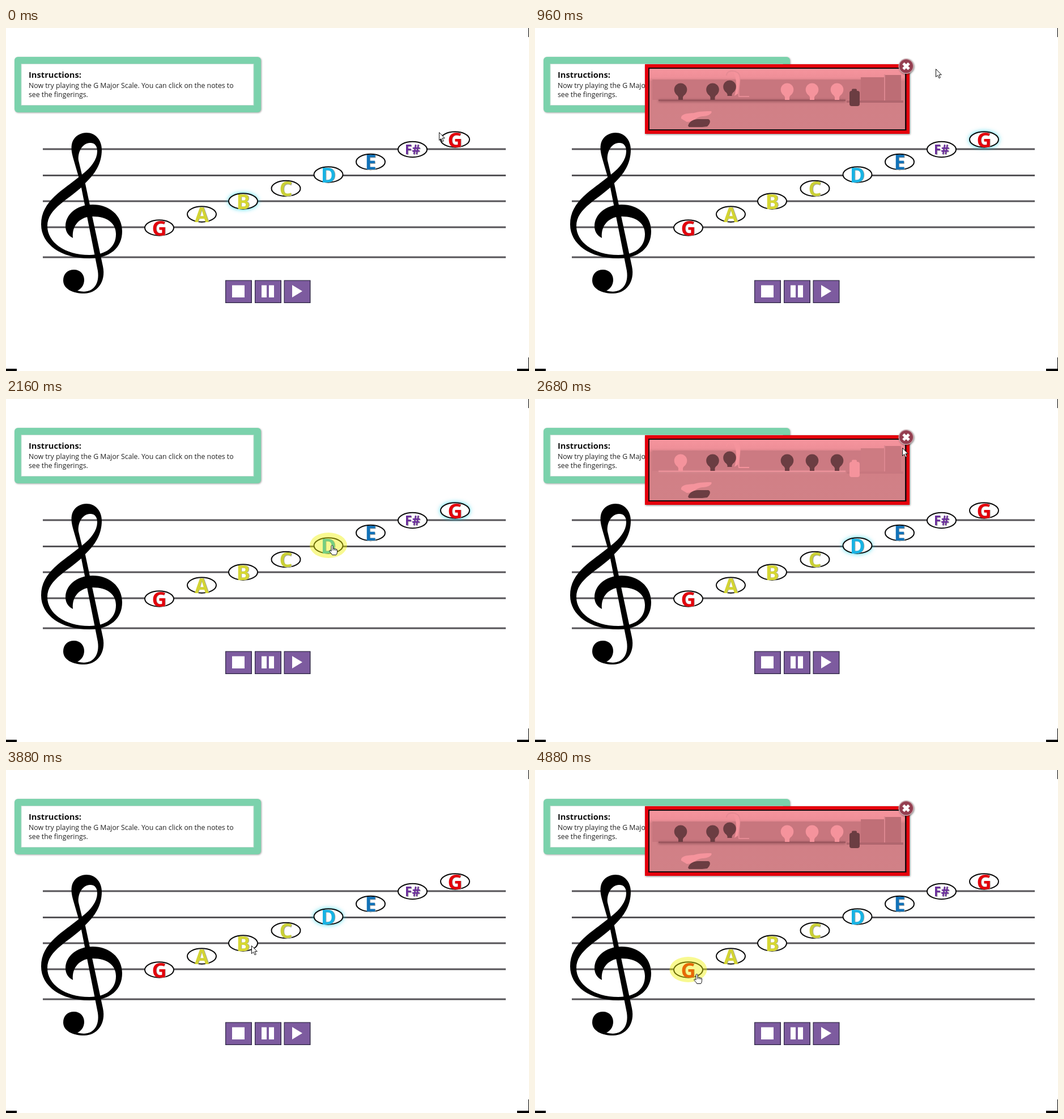
An HTML page with a canvas that plays this animation: 923 px wide and 606 px high, repeating every 4.92 s.

```html
<!DOCTYPE html>
<html lang="en">
<head>
<meta charset="utf-8">
<title>G Major Scale</title>
<style>
html, body { margin: 0; width: 100%; height: 100%; overflow: hidden; background: #fff; }
canvas { display: block; width: 100vw; height: 100vh; }
</style>
</head>
<body>
<canvas id="stage" width="923" height="606"></canvas>
<script>
const LOOP = 4920, STEP = 40;
const ctx = document.getElementById('stage').getContext('2d');
const FONT = '"Open Sans", "Noto Sans", sans-serif';

const notes = [
  ['G', 270.5, 353, '#e3000b'], ['A', 345.5, 329, '#d3d433'],
  ['B', 418.5, 306, '#d6d733'], ['C', 494, 283.5, '#c9cf35'],
  ['D', 569, 259, '#18b3e4'], ['E', 643.5, 236.5, '#1272b8'],
  ['F#', 717.5, 214.5, '#6a2c9c'], ['G', 792.5, 197, '#e3000b']
];

// Each move: start, end, from, control point, to
const moves = [
  [0, 200, [764, 184], [784, 188], [797, 198]],
  [680, 1200, [797, 198], [705, 25], [655, 68]],
  [1480, 2050, [655, 68], [640, 190], [575, 258]],
  [2400, 2800, [575, 258], [645, 95], [655, 68]],
  [3160, 4300, [658, 67], [551, 308], [285, 360]]
];
const handTimes = [[120, 720], [1160, 1280], [2040, 2440], [2760, 2960], [4280, LOOP]];
const hovers = [[7, 120, 720], [4, 2080, 2440], [0, 4320, LOOP]];
const glows = [[2, 0, 480], [7, 480, 2400], [4, 2400, 4880]];
const popups = [
  { span: [440, 1280], closed: [1, 1, 1, 0, 0, 0, 1] },
  { span: [2360, 2960], closed: [0, 1, 1, 1, 1, 1, 0] },
  { span: [4880, LOOP], closed: [1, 1, 1, 0, 0, 0, 1] }
];

const within = (t, [a, b]) => t >= a && t < b;
const clefParts = [
  // upper loop
  'M142 185C158 185 169 198 169 215C169 240 157 258 139 275L129 266L118 228C114 213 115 203 120 196C125 189 133 185 142 185Z' +
  'M149 203C137 202 126 217 128 234L134 259C150 247 161 232 161 218C161 209 157 203 149 203Z',
  // belly and spiral
  'M130 262C102 286 62 305 62 347C62 382 97 407 147 407C184 407 205 388 205 359C205 330 181 312 153 312C124 312 105 330 105 350C105 360 110 367 118 371C116 349 130 333 153 333C180 333 194 346 194 364C194 387 177 401 147 401C103 401 73 378 73 350C73 318 112 303 139 276Z',
  // stem and tail
  'M129 262L138 266L171 421C177 449 160 469 138 469C118 469 101 461 101 446C101 434 109 427 120 427C131 427 138 435 138 445C138 454 133 461 126 464C150 471 166 456 162 429Z'
].map(d => new Path2D(d));
const arrow = new Path2D('M0 0V14L3.2 11L5.6 16.2L7.8 15.2L5.5 10.2H9.8Z');
const hand = new Path2D('M-1.5 1Q0 -1 1.5 1V6Q3 4.8 4.3 6.4Q5.8 5.4 6.8 7Q8.6 6.4 9 8.2V12Q9 14.5 7.2 17H.2Q-1.2 14 -4.5 11Q-5 8.5 -3.2 9L-1.5 10.6Z');
const closeMark = new Path2D('M-5 -5L5 5M5 -5L-5 5');

function rect(x, y, w, h, color) {
  ctx.fillStyle = color;
  ctx.fillRect(x, y, w, h);
}

function round(x, y, w, h, r, color) {
  ctx.fillStyle = color;
  ctx.beginPath();
  ctx.roundRect(x, y, w, h, r);
  ctx.fill();
}

function oval(x, y, rx, ry) {
  ctx.beginPath();
  ctx.ellipse(x, y, rx, ry, 0, 0, Math.PI * 2);
}

function shape(d, color) {
  ctx.fillStyle = color;
  ctx.fill(new Path2D(d));
}

function write(str, x, y, font, color) {
  ctx.font = `${font} ${FONT}`;
  ctx.fillStyle = color;
  ctx.fillText(str, x, y);
}

function shadow(color, blur, dx = 0, dy = 0) {
  ctx.shadowColor = color;
  ctx.shadowBlur = blur;
  ctx.shadowOffsetX = dx;
  ctx.shadowOffsetY = dy;
}

const noShadow = () => shadow('transparent', 0);

function drawInstructions() {
  shadow('rgba(0,0,0,.35)', 3, 1, 1);
  round(15, 51, 435, 98, 6, '#7bd2ac');
  noShadow();
  rect(26.5, 63, 411, 74, '#b9d9cb');
  rect(27.5, 64, 409, 72, '#fff');
  ctx.textAlign = 'left';
  write('Instructions:', 40, 88, 'bold 14.67px', '#111');
  write('Now try playing the G Major Scale. You can click on the notes to', 40, 106, '12.3px', '#222');
  write('see the fingerings.', 40, 122, '12.3px', '#222');
}

function drawStaff() {
  for (const y of [214, 260.5, 306, 352, 405]) rect(65, y - 1.5, 817, 3, '#555357');
  ctx.fillStyle = '#000';
  clefParts.forEach(p => ctx.fill(p, 'evenodd'));
}

function drawNote([name, x, y, color], glowing) {
  ctx.fillStyle = '#fff';
  ctx.strokeStyle = '#080808';
  ctx.lineWidth = 2;
  if (glowing) shadow('#19d3ee', 9);
  oval(x, y, 25.5, 13.7);
  ctx.fill();
  noShadow();
  ctx.stroke();
  const sharp = name.length > 1;
  const font = sharp ? 'bold 22.5px' : 'bold 36px';
  const base = y + (sharp ? 8.5 : 13.5);
  ctx.textAlign = 'center';
  write(name, x + 1, base + .5, font, '#a3a4a0');
  write(name, x, base, font, color);
}

function drawHover([, x, y]) {
  ctx.fillStyle = 'rgba(238,240,0,.43)';
  oval(x, y - .5, 33, 22.5);
  ctx.fill();
}

function drawButtons() {
  for (const x of [387, 439, 490.5]) {
    rect(x, 445.5, 47, 40.5, '#2e2745');
    rect(x + 1.2, 446.7, 44.4, 38, '#7d5b9f');
  }
  rect(399, 454.5, 22, 21.5, '#fff');
  rect(451, 454.5, 9, 21.5, '#fff');
  rect(464, 454.5, 9, 21.5, '#fff');
  shape('M505 454L523 465L505 476Z', '#fff');
}

function drawFlute(closed) {
  const dark = '#6b3d42', light = '#f5939c';
  const low = closed[0];
  const bed = ctx.createLinearGradient(0, 72, 0, 179);
  bed.addColorStop(0, '#f6949d');
  bed.addColorStop(.14, '#ef8f98');
  bed.addColorStop(.21, '#d17e85');
  bed.addColorStop(1, '#d18187');
  rect(202, 72, 451, 107, bed);
  rect(207, 91, 370, 36, low ? '#c8767e' : '#cc7a82');
  rect(575, 87, 41, 42, low ? '#c06f77' : '#cd7b82');
  rect(618, 83, 28, 46, low ? '#bd6d75' : '#c9777f');
  rect(616, 82, 2, 46, '#dc8790');
  shadow(low ? '#7e444b' : '#d58b92', 4, 0, 1);
  rect(218, 126.5, 330, 2.5, low ? '#9b565e' : '#eb929a');
  noShadow();
  rect(550, 128, 100, 4, low ? '#b0666e' : '#c8777f');

  ctx.strokeStyle = low ? '#e58b94' : light;
  ctx.lineWidth = 2;
  ctx.stroke(new Path2D('M338 84C338 75 350 74 358 79C366 86 357 107 360 121H378'));
  shape('M350 77C366 80 361 94 358 116L352 120C357 104 356 90 350 77Z', light);

  [[257, 109], [313.5, 109], [343.5, 104], [445, 109], [489, 109], [533, 109]].forEach(([x, y], i) => {
    ctx.fillStyle = closed[i] ? dark : light;
    oval(x, y, 11.3, 11.5);
    ctx.fill();
    const h = i === 2 ? 16 : 18;
    shape(`M${x - 7} ${y + 8}H${x + 7}L${x + 4} ${y + 13}V${y + h}H${x - 4}V${y + 13}Z`, ctx.fillStyle);
  });
  const thumb = closed[6] ? dark : light;
  round(555, 111, 18, 27, 4, thumb);
  round(559, 107.5, 9, 7, 2, thumb);
  shape('M258 160C257 151 270 151 281 150C290 147 301 147 311 147C314 151 305 156 295 156C284 157 281 166 268 166Z', light);
  shape('M270 173C272 166 277 162 287 161H306C311 163 309 169 304 174L295 175H272Z', dark);
}

function drawPopup(closed) {
  shadow('rgba(0,0,0,.5)', 3, 1, 1);
  rect(194, 64, 467, 123, '#e5000c');
  noShadow();
  rect(200, 70, 455.5, 111, '#16070a');
  drawFlute(closed);
  shadow('rgba(0,0,0,.45)', 3, 1, 1);
  ctx.fillStyle = '#c9a9ae';
  oval(655, 67.5, 13.5, 13.5);
  ctx.fill();
  noShadow();
  ctx.fillStyle = '#943e50';
  oval(655, 67.5, 12, 12);
  ctx.fill();
  ctx.save();
  ctx.translate(655, 67.5);
  ctx.strokeStyle = '#fff';
  ctx.lineWidth = 5;
  ctx.stroke(closeMark);
  ctx.restore();
}

function cursorAt(t) {
  let pos = moves[0][2];
  for (const [t0, t1, a, c, b] of moves) {
    if (t < t0) break;
    const p = Math.min(1, (t - t0) / (t1 - t0));
    const e = p * p * (3 - 2 * p);
    pos = a.map((v, i) => (1 - e) ** 2 * v + 2 * e * (1 - e) * c[i] + e * e * b[i]);
  }
  return pos;
}

function drawCursor(t) {
  const [x, y] = cursorAt(t);
  const pointing = handTimes.some(s => within(t, s));
  const path = pointing ? hand : arrow;
  ctx.save();
  ctx.translate(Math.round(x) + .5, Math.round(y) + .5);
  ctx.fillStyle = '#fff';
  ctx.strokeStyle = '#111';
  ctx.lineWidth = 1;
  ctx.lineJoin = 'round';
  ctx.fill(path);
  ctx.stroke(path);
  if (pointing) ctx.stroke(new Path2D('M1.5 6V9M4.3 6.5V9M6.8 7.3V9.5'));
  ctx.restore();
}

function drawEdges() {
  rect(0, 602, 19, 4, '#000');
  rect(902, 602, 21, 4, '#000');
  rect(922, 0, 1, 16, '#000');
  rect(922, 582, 1, 24, '#000');
}

function draw(t) {
  rect(0, 0, 923, 606, '#fff');
  drawInstructions();
  drawStaff();
  const glow = glows.find(([, ...s]) => within(t, s));
  notes.forEach((n, i) => drawNote(n, glow && glow[0] === i));
  drawButtons();
  const popup = popups.find(p => within(t, p.span));
  if (popup) drawPopup(popup.closed);
  const hover = hovers.find(([, ...s]) => within(t, s));
  if (hover) drawHover(notes[hover[0]]);
  drawCursor(t);
  drawEdges();
}

const begin = performance.now();
function tick() {
  const t = (performance.now() - begin) % LOOP;
  draw(Math.floor(t / STEP) * STEP);
  requestAnimationFrame(tick);
}
tick();
</script>
</body>
</html>
```
